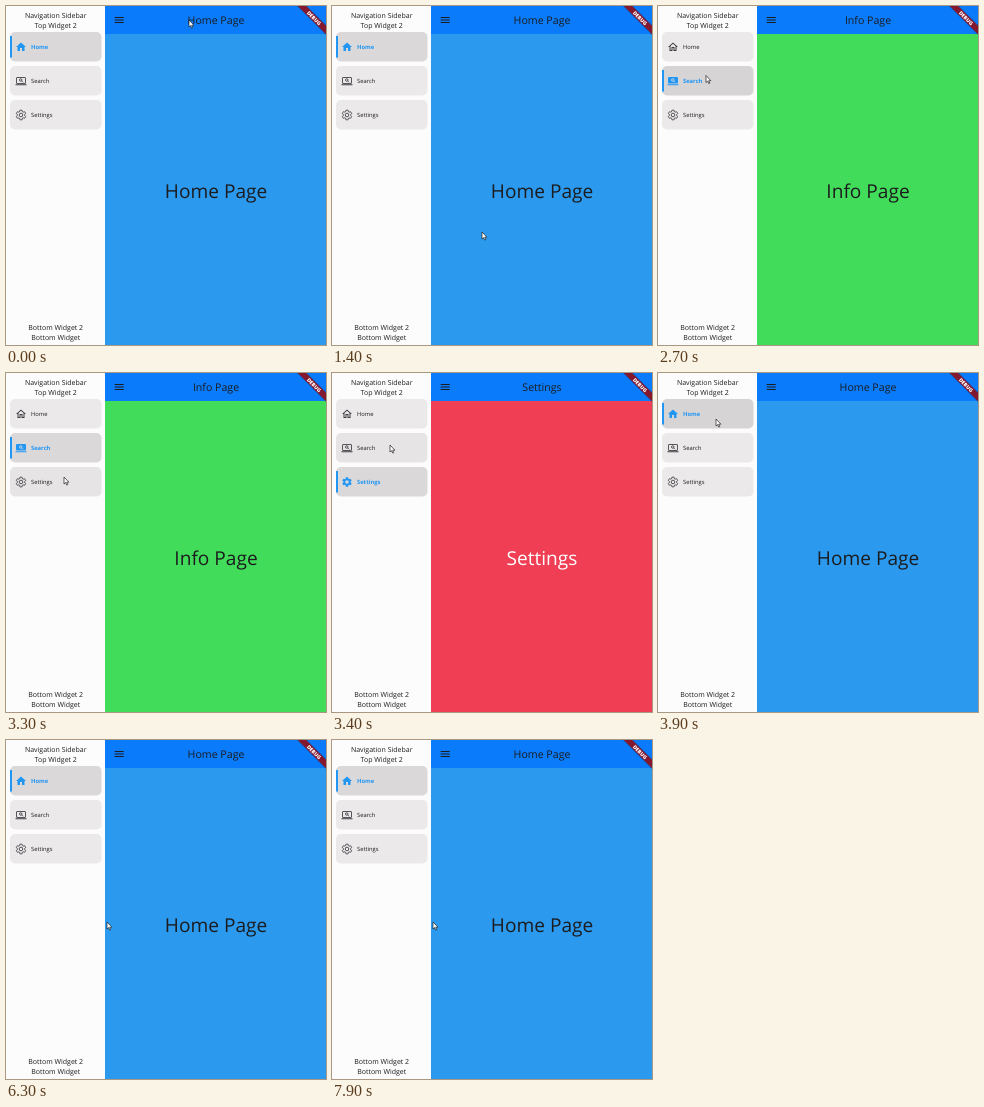
These frames come from a looping animation (320 px wide and 339 px high, 8000 ms). An HTML page:

```html
<!DOCTYPE html>
<html lang="en">
<head>
<meta charset="utf-8">
<title>Navigation sidebar</title>
<style>
  html, body { margin: 0; width: 100%; height: 100%; overflow: hidden; background: #fdfcfd; }
  svg { display: block; width: 320px; height: 339px; }
  text { font-family: "Open Sans", "Noto Sans", sans-serif; fill: #1c1c1e; text-rendering: geometricPrecision; }
  .mid { text-anchor: middle; }
  .note { font-size: 7px; }
  .tile rect { fill: #ebe9ea; }
  .tile text { font-size: 5.8px; }
  .tile .bar, .tile .on { display: none; }
  .tile .icon { fill: #3c3c40; }
  .tile.active rect { fill: #dbd8da; }
  .tile.active .bar { display: inline; fill: #2196f3; }
  .tile.active text { font-weight: 700; fill: #2196f3; }
  .tile.active .icon { fill: #2196f3; }
  .tile.active .on { display: inline; }
  .tile.active .off { display: none; }
  .tile .line { fill: none; stroke: #3c3c40; stroke-width: 1.7; }
  .tile.hover .box { filter: brightness(.98); }
</style>
</head>
<body>
<svg viewBox="0 0 320 339">
  <defs>
    <path id="gear" d="M19.14 12.94c.04-.3.06-.61.06-.94 0-.32-.02-.64-.07-.94l2.03-1.58c.18-.14.23-.41.12-.61l-1.92-3.32c-.12-.22-.37-.29-.59-.22l-2.39.96c-.5-.38-1.03-.7-1.62-.94l-.36-2.54c-.04-.24-.24-.41-.48-.41h-3.84c-.24 0-.43.17-.47.41l-.36 2.54c-.59.24-1.13.57-1.62.94l-2.39-.96c-.22-.08-.47 0-.59.22L2.74 8.87c-.12.21-.08.47.12.61l2.03 1.58c-.05.3-.09.63-.09.94s.02.64.07.94l-2.03 1.58c-.18.14-.23.41-.12.61l1.92 3.32c.12.22.37.29.59.22l2.39-.96c.5.38 1.03.7 1.62.94l.36 2.54c.05.24.24.41.48.41h3.84c.24 0 .44-.17.47-.41l.36-2.54c.59-.24 1.13-.56 1.62-.94l2.39.96c.22.08.47 0 .59-.22l1.92-3.32c.12-.22.07-.47-.12-.61zM12 15.6a3.6 3.6 0 1 1 0-7.2 3.6 3.6 0 0 1 0 7.2z"/>
  </defs>
  <rect width="99" height="339" fill="#fdfcfd"/>
  <g class="mid note">
    <text x="49.7" y="12">Navigation Sidebar</text>
    <text x="49.7" y="22">Top Widget 2</text>
    <text x="49.7" y="323.7">Bottom Widget 2</text>
    <text x="49.7" y="333.7">Bottom Widget</text>
  </g>

  <g class="tile" transform="translate(0 26)">
    <rect class="box" x="4" width="91.5" height="29.5" rx="5"/>
    <path class="bar" d="M4 4h2v21.5h-2z"/>
    <g class="icon" transform="translate(9 9) scale(.5)">
      <path class="on" d="M10 20v-6h4v6h5v-8h3L12 3 2 12h3v8z"/>
      <path class="off" d="M12 5.69l5 4.5V18h-2v-6H9v6H7v-7.81l5-4.5M12 3L2 12h3v8h6v-6h2v6h6v-8h3z"/>
    </g>
    <text x="25" y="17">Home</text>
  </g>
  <g class="tile" transform="translate(0 60)">
    <rect class="box" x="4" width="91.5" height="29.5" rx="5"/>
    <path class="bar" d="M4 4h2v21.5h-2z"/>
    <g class="icon" transform="translate(9 9) scale(.5)">
      <path d="M1 18.5h22v2H1z"/>
      <path class="on" d="M4 4h16q2 0 2 2v9q0 2-2 2H4q-2 0-2-2V6q0-2 2-2z"/>
      <path class="line off" d="M4 5h16q1 0 1 1v10q0 1-1 1H4q-1 0-1-1V6q0-1 1-1z"/>
      <path class="line off" d="M14 10a2.5 2.5 0 1 0-5 0 2.5 2.5 0 0 0 5 0M13.3 11.8l2.7 2.7"/>
      <path class="on" d="M14 10a2.5 2.5 0 1 0-5 0 2.5 2.5 0 0 0 5 0M13.3 11.8l2.7 2.7" fill="none" stroke="#dbd8da" stroke-width="1.7"/>
    </g>
    <text x="25" y="17">Search</text>
  </g>
  <g class="tile" transform="translate(0 94)">
    <rect class="box" x="4" width="91.5" height="29.5" rx="5"/>
    <path class="bar" d="M4 4h2v21.5h-2z"/>
    <g class="icon" transform="translate(9 9) scale(.5)">
      <use class="on" href="#gear"/>
      <use class="line off" href="#gear"/>
    </g>
    <text x="25" y="17">Settings</text>
  </g>

  <rect id="body" x="99" y="27" width="221" height="312"/>
  <rect x="99" width="221" height="28" fill="#0a7bfb"/>
  <path d="M108.7 11h9v1h-9zm0 2.5h9v1h-9zm0 2.5h9v1h-9z" fill="#1c1c1e"/>
  <text id="title" class="mid" x="210" y="18.2" font-size="10.6"/>
  <text id="big" class="mid" x="210" y="191.6" font-size="19.1"/>
  <g transform="translate(320 0) rotate(45)">
    <path d="M-40 13.3h80v7.4h-80z" fill="#000" opacity=".18"/>
    <path d="M-40 14h80v6h-80z" fill="#84182f"/>
    <text class="mid" y="18.9" font-size="5.1" font-weight="800" style="fill:#fff">DEBUG</text>
  </g>
  <path id="cursor" d="M0 0v7l1.6-1.4 1.1 2.5 1.1-.5-1.1-2.4h2.2z" fill="#fff" stroke="#222" stroke-width=".7" stroke-linejoin="round"/>
</svg>
<script>
const LOOP = 8000, STEP = 100;
const pages = [
  { name: "Home Page", color: "#2b99ee", ink: "#1c1c1e" },
  { name: "Info Page", color: "#41dd5a", ink: "#1c1c1e" },
  { name: "Settings", color: "#f03e54", ink: "#fff" }
];
// [time, page]
const clicks = [[0, 0], [2700, 1], [3400, 2], [3700, 0]];
// [time, x, y]
const path = [
  [0, 183, 14], [500, 183, 30], [1000, 180, 185], [1400, 150, 226], [1900, 105, 150],
  [2300, 52, 76], [2600, 48, 69], [2800, 48, 70], [3100, 58, 104], [3300, 58, 104],
  [3400, 58, 72], [3600, 58, 46], [3900, 58, 46], [4400, 52, 14], [4700, 52, 16],
  [5300, 50, 316], [5600, 52, 317], [6200, 101, 182], [8000, 101, 182]
];
const byId = id => document.getElementById(id);
const tiles = [...document.querySelectorAll(".tile")];

function cursorAt(t) {
  const i = path.findIndex(p => p[0] > t);
  const [t0, x0, y0] = path[i - 1], [t1, x1, y1] = path[i];
  const u = (t - t0) / (t1 - t0), e = u * u * (3 - 2 * u);
  return [x0 + (x1 - x0) * e, y0 + (y1 - y0) * e];
}

function draw(now) {
  const t = Math.floor(now % LOOP / STEP) * STEP;
  const active = clicks.filter(c => c[0] <= t).pop()[1];
  const page = pages[active];
  const [x, y] = cursorAt(t);
  byId("body").setAttribute("fill", page.color);
  byId("title").textContent = byId("big").textContent = page.name;
  byId("big").style.fill = page.ink;
  byId("cursor").setAttribute("transform", `translate(${x} ${y})`);
  tiles.forEach((tile, i) => {
    const top = 26 + 34 * i;
    tile.classList.toggle("active", i === active);
    tile.classList.toggle("hover", x > 4 && x < 95 && y > top && y < top + 30);
  });
}

const start = performance.now();
function tick() {
  draw(performance.now() - start);
  requestAnimationFrame(tick);
}
tick();
</script>
</body>
</html>
```
